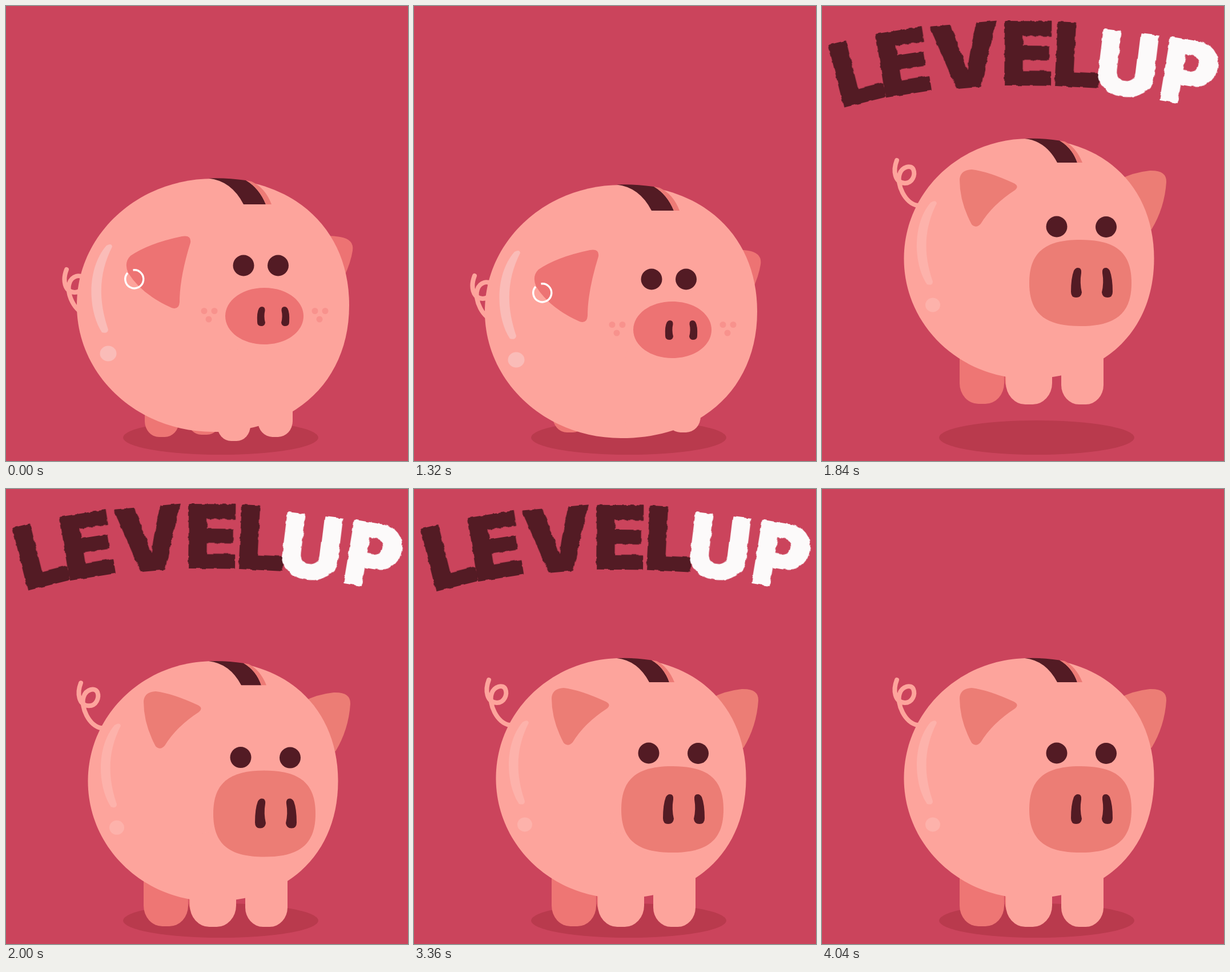
Animation of 704 by 796 pixels, one loop 9000 ms. Source, as an HTML page:

```html
<!DOCTYPE html>
<html lang="en">
<head>
<meta charset="utf-8">
<title>Level up</title>
<style>
  html, body { margin: 0; width: 100%; height: 100%; overflow: hidden; background: #cb445c; }
  svg { display: block; width: 704px; height: 796px; }
  text { font: 900 153px Inter, "Open Sans", sans-serif; stroke-width: 2; stroke-linejoin: round; }
</style>
</head>
<body>
<svg viewBox="0 0 704 796">
  <defs>
    <filter id="rough" x="-20%" y="-20%" width="140%" height="140%" color-interpolation-filters="sRGB">
      <feTurbulence type="fractalNoise" baseFrequency=".1" numOctaves="1" seed="4"/>
      <feDisplacementMap in="SourceGraphic" scale="6" xChannelSelector="R" yChannelSelector="G"/>
    </filter>
    <clipPath id="line"><rect x="-25" y="-145" width="190" height="155"/></clipPath>
  </defs>
  <ellipse cx="376" cy="755" rx="171" ry="30" fill="#b93a4d"/>
  <g id="pig"></g>
  <g id="title"></g>
</svg>
<script>
const LOOP = 9000, STEP = 40;
const SKIN = '#fda49c', DARK = '#531b24';
const pig = document.getElementById('pig'), title = document.getElementById('title');

const unit = (t, from, to) => Math.min(1, Math.max(0, (t - from) / (to - from)));
const smooth = u => u * u * (3 - 2 * u);
const lerp = (a, b, p) => a + (b - a) * p;

// Blends every number of one string into the matching number of another.
function blend(a, b, p) {
  const ends = b.match(/[\d.]+/g);
  let i = 0;
  return a.replace(/[\d.]+/g, n => lerp(+n, +ends[i++], p).toFixed(2));
}

// Heading: letter, foot x, foot y, angle, indent
const letters = [
  ['L', 41, 177, -14, -9], ['E', 114, 160, -9, -9], ['V', 192, 149, -5, 4],
  ['E', 322, 139, .5, -9], ['L', 410, 140, 3, -9],
  ['U', 479, 152, 7, -6], ['P', 592, 165, 9.5, -7]
];
title.innerHTML = letters.map(([ch, x, y, angle, indent], i) => {
  const color = i < 5 ? DARK : '#fcfafa';
  return `<g transform="translate(${x} ${y}) rotate(${angle})" clip-path="url(#line)">
    <g class="slide"><text x="${indent}" y="-1" fill="${color}" stroke="${color}" filter="url(#rough)">${ch}</text></g></g>`;
}).join('');
const slides = [...title.querySelectorAll('.slide')];

function drawTitle(t) {
  slides.forEach((el, i) => {
    const enter = i < 5 ? 1325 : 1575, leave = i < 5 ? 3320 : 3760;
    const drop = (1 - unit(t, enter, enter + 265)) ** 2 + unit(t, leave, leave + 280) ** 2.2;
    el.setAttribute('transform', `translate(0 ${126 * drop})`);
    el.setAttribute('visibility', drop < 1 ? 'visible' : 'hidden');
  });
}

// Height of a part: crouch, leap through three known heights, soft landing.
function height(t, crouch, h0, h1, h2, sink) {
  if (t < 1240) return crouch * smooth(unit(t, 960, 1160));
  const a = t - 1320, b = t - 1600, c = t - 1840;
  const arc = h0 * b * c / 145600 - h1 * a * c / 67200 + h2 * a * b / 124800;
  if (t < 1640) return Math.min(crouch, arc);
  const u = unit(t, 1955, 2260);
  return Math.min(0, arc) + sink * Math.sin(Math.PI * u) * (1 - u);
}

function drawPig(t) {
  const p = smooth(unit(t, 1320, 1820)), earP = smooth(unit(t, 1400, 1840));
  const legP = smooth(unit(t, 1490, 1840)), tailP = smooth(unit(t, 1525, 1820));
  const body = height(t, 24, 11, -105, -64, 14);
  const face = height(t, 24, 24, -117, -76, 20);
  const ears = height(t, 24, 24, -113, -62, 16);
  const legs = height(t, 0, -8, -102, -69, 0);
  const mix = (a, b, q = p) => blend(a, b, q), num = (a, b, q = p) => lerp(a, b, q);

  const group = (dy, content, extra = '') => `<g transform="translate(0 ${dy.toFixed(2)})" ${extra}>${content}</g>`;
  const path = (a, b, fill, q = p) => `<path d="${mix(a, b, q)}" fill="${fill}"/>`;
  const circle = (x, y, r, fill) => `<circle cx="${x}" cy="${y}" r="${r}" fill="${fill}"/>`;
  // Each leg is given as left edge, width and bottom in both poses.
  const leg = (from, to, fill) => {
    const [x, w, bottom] = from.map((v, i) => lerp(v, to[i], legP));
    return `<rect x="${x}" y="600" width="${w}" height="${bottom - 600}" rx="${w * .42}" ry="${w * .46}" fill="${fill}"/>`;
  };
  // Oval whose two halves can bulge differently.
  const oval = (cx, cy, rx, ry, left, right, fill) => {
    const l = rx * left, r = rx * right, lh = ry * left, rh = ry * right;
    return `<path transform="translate(${cx} ${cy})" fill="${fill}" d="M${-rx} 0C${-rx} ${-lh} ${-l} ${-ry} 0 ${-ry}
      C${r} ${-ry} ${rx} ${-rh} ${rx} 0C${rx} ${rh} ${r} ${ry} 0 ${ry}C${-l} ${ry} ${-rx} ${lh} ${-rx} 0Z"/>`;
  };

  const blush = mix('rgb(237,115,115)', 'rgb(236,125,117)');
  const shine = mix('rgb(250,188,184)', 'rgb(253,178,171)');
  const back = '#ee7674';

  const hindLegs = leg([318, 58, 750], [320, 74, 756], back) + leg([243, 60, 754], [241, 78, 765], back);
  const foreLegs = leg([370, 58, 761], [322, 81, 766], SKIN) + leg([441, 61, 754], [419, 74, 766], SKIN);
  const farEar = `<g transform="translate(${-8 * Math.sin(Math.PI * earP)} 0)">`
    + path('M560 402Q575 402 585 404Q610 408 607 428Q604 448 592 474L560 480Z',
      'M520 366Q545 353 574 350Q604 349 603 370Q600 415 577 453L540 440Z', blush, earP) + '</g>';
  const tail = `<path d="M131 334C124 352 127 373 145 374C158 374 164 360 160 350C156 341 140 345 136 358C130 375 145 410 168 413"
    transform="translate(${lerp(-25, 0, tailP)} ${lerp(127, 0, tailP)})"
    fill="none" stroke="${SKIN}" stroke-width="8" stroke-linecap="round"/>`;
  const trunk = oval(362.5, num(523.5, 506), num(238.5, 219), num(221.5, 210), .555, .6, SKIN);
  const slot = path('M355 301.5Q395 306 416 347H455Q443 318 420 305Q385 300 355 301.5Z',
      'M355 296Q392 300 412 338H447Q438 312 416 299.5Q385 294.500 355 296Z', DARK)
    + path('M420 305Q443 318 455 347H465Q454 318 430 307Z',
      'M416 299.5Q438 312 447 338H456Q445 311 425 301Z', '#ed7b76');
  const gloss = path('M176 419Q185 414 186 421C164 465 160 510 179 566Q178 574 168 571C144 535 140 460 176 419Z',
      'M190 408Q199 402 201 409C180 450 176 494 194 546Q194 554 184 551C161 517 157 447 190 408Z', shine)
    + `<ellipse cx="${num(179, 194)}" cy="${num(608, 587)}" rx="${num(14.5, 13)}" ry="${num(13.5, 12.5)}" fill="${shine}"/>`;

  const extras = `opacity="${Math.max(0, 1 - 2 * p)}"`;
  const nearEar = path('M218 437Q250 415 308 403Q325 400 323 414Q304 475 304 518Q303 532 290 528Q238 505 214 467Q206 449 218 437Z',
      'M262 348Q290 351 336 372Q346 377 338 384Q298 410 278 443Q270 452 262 444Q241 405 241 366Q242 349 262 348Z', blush, earP)
    + `<path d="M222.500 462A16 16 0 1 1 213 467" fill="none" stroke="#fff" stroke-width="3.4" ${extras}/>`;

  const bulge = num(.56, .7);
  const snout = oval(452.5, num(542.5, 560.5), num(68.5, 89.5), num(49.5, 75.5), bulge, bulge, blush);
  const nostril = path('M448 526Q454 526 453.500 533Q451 543 454 554Q453 560 447 560Q440 560 440 553Q439 536 443 529Q445 526 448 526Z',
    'M448 534Q455 534 454 543Q451 560 455 577Q454 586 445 586Q436 586 436 576Q436 552 441 539Q444 534 448 534Z', DARK);
  const nostrils = nostril + `<g transform="translate(${num(936, 945)} 0) scale(-1 1)">${nostril}</g>`;
  const eyes = circle(num(416, 411), num(454, 462), 18.5, DARK)
    + circle(num(476.5, 497.5), num(454, 462.5), 18.5, DARK);
  const freckles = [347, 541].map(x => circle(x, 533.5, 5.5, '#f8928d')
    + circle(x + 18, 533.5, 5.5, '#f8928d') + circle(x + 8, 548, 5.5, '#f8928d')).join('');

  pig.innerHTML = group(legs, hindLegs) + group(ears, farEar) + group(body, tail + trunk)
    + group(legs, foreLegs) + group(body, slot + gloss) + group(ears, nearEar)
    + group(face, freckles, extras) + group(face, snout + nostrils + eyes);
}

let start;
function frame(now) {
  start ??= now;
  const t = Math.floor((now - start) % LOOP / STEP) * STEP;
  drawPig(t);
  drawTitle(t);
  requestAnimationFrame(frame);
}
requestAnimationFrame(frame);
</script>
</body>
</html>
```
